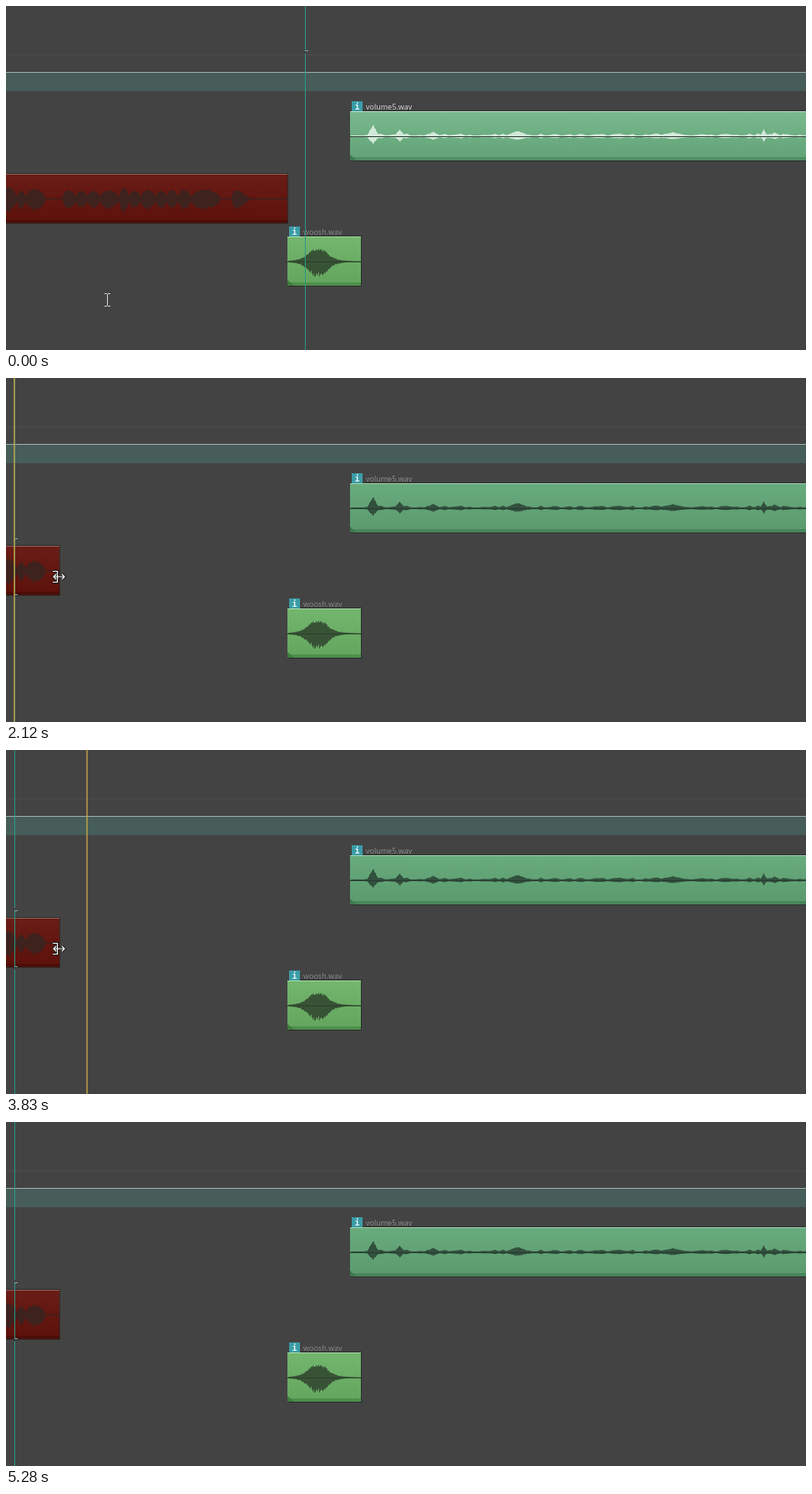
These frames come from a looping animation (958 px wide and 412 px high, 6.15 s). An HTML page with a canvas:

```html
<!DOCTYPE html>
<html>
<head>
<meta charset="utf-8">
<style>
html, body { margin: 0; width: 100%; height: 100%; overflow: hidden; background: #434343; }
canvas { display: block; }
</style>
</head>
<body>
<canvas id="stage" width="958" height="412"></canvas>
<script>
const ctx = document.getElementById('stage').getContext('2d');
const LOOP = 6150, SELECT = 1130, TRIM = 2120;

// Each word is a run of syllable borders; each burst is [centre x, half width, height]
const WORDS = [[-6, 13, 24, 47], [68, 84, 98, 113, 136, 147, 162, 179, 193, 206, 222, 257]];
const BURSTS = [[439, 7, 14], [471, 6, 8], [511, 8, 5], [612, 14, 6], [798, 18, 4], [907, 4, 8], [920, 7, 4]];

const POINTER = [[0, 'beam', 121, 352], [300, 'beam', 94, 288], [450, 'arrow', 75, 251],
  [600, 'arrow', 67, 241], [720, 'arrow', 64, 238], [TRIM, 'trim', 63, 238],
  [5030, 'beam', 99, 278], [5155, 'beam', 514, 385], [5280, 'none', 0, 0]];

function noise(n) {
  const s = Math.sin(n * 12.9898) * 43758.5453;
  return s - Math.floor(s);
}

function smoothNoise(n) {
  const i = Math.floor(n);
  return noise(i) + (noise(i + 1) - noise(i)) * (n - i);
}

function voiceLevel(x) {
  if (x >= 270 && x < 292) return 10 * Math.min(1, (x - 268) / 5, (292 - x) / 14);
  for (const word of WORDS) {
    const i = word.findIndex(border => border > x);
    if (i < 1) continue;
    const u = (x + 0.5 - word[i - 1]) / (word[i] - word[i - 1]);
    return (10 + 5 * noise(word[i])) * Math.sin(Math.PI * u) ** 0.5 * (1.1 - 0.3 * u);
  }
  return 0;
}

function volumeLevel(x) {
  const ripple = x < 430 ? 0 : 2.6 * smoothNoise(x / 5) ** 2;
  return Math.max(ripple, ...BURSTS.map(([c, w, h]) => h * (1 - Math.abs(x - c) / w)));
}

const wooshLevel = x => 16 / (1 + Math.abs((x - 373) / 14) ** 3);

function rect(x, y, w, h, color) {
  ctx.fillStyle = color;
  ctx.fillRect(x, y, w, h);
}

function wave(level, from, to, mid, below, base, color) {
  for (let x = from; x < to; x++) {
    const h = level(x);
    const up = base + h * (1 - 0.2 * noise(x));
    const down = base + h * below * (1 - 0.3 * noise(x + 500));
    rect(x, mid - up, 1, up + down, color);
  }
}

function body(x, y, w, light, dark, edge, foot) {
  const g = ctx.createLinearGradient(0, y, 0, y + 59);
  g.addColorStop(0, light);
  g.addColorStop(1, dark);
  rect(x, y - 1, w + 1, 61, '#2b2f2c');
  rect(x, y, w, 59, g);
  rect(x, y, w, 1, edge);
  rect(x, y + 55, w, 4, foot);
}

function corner(x, y, color) {
  ctx.fillStyle = color;
  ctx.fill(new Path2D(`M${x} ${y}l8 7h-8z`));
}

function label(text, x, y, icon, color) {
  if (icon) {
    rect(x, y, 13, 12, '#3a9ca6');
    ctx.font = 'bold 10px "DejaVu Sans Mono", monospace';
    ctx.fillStyle = '#e8f4f4';
    ctx.fillText('i', x + 3.5, y + 10);
  }
  ctx.font = '9px "Open Sans", sans-serif';
  ctx.fillStyle = color;
  ctx.fillText(text, x + (icon ? 17 : 0), y + 10);
}

function voiceClip(end, selected) {
  if (selected) body(0, 201, end, '#7c332c', '#661c15', '#a46a64', '#551610');
  else body(0, 201, end, '#691d16', '#5d110b', '#94605b', '#4d0d08');
  wave(voiceLevel, 0, end, 231, 1.15, 0.7, selected ? '#d5b9b6' : '#3d221e');
}

function volumeClip(selected, icon) {
  if (selected) body(412, 126, 546, '#7ab98e', '#61a277', '#b9dfc6', '#4f8f63');
  else body(412, 126, 546, '#68ab7d', '#5a9a6e', '#9fd0b0', '#488559');
  corner(412, 178, '#3f7a50');
  wave(volumeLevel, 413, 958, 156, 0.7, 1, selected ? '#d3e9da' : '#32503e');
  rect(412, 156, 546, 1, '#263b2e');
  label('volume5.wav', 414, 114, icon, selected ? '#dcdcdc' : '#929292');
}

function wooshClip(icon) {
  body(337, 276, 88, '#73b66d', '#64a55e', '#a9d9a5', '#4f8f4b');
  corner(337, 328, '#427c3f');
  wave(wooshLevel, 338, 425, 306, 1.15, 0, '#385236');
  rect(337, 306, 88, 1, '#2b402a');
  label('woosh.wav', 339, 264, icon, '#8a8a8a');
}

// Edit cursor: a line broken by the bracket around the active track
function editCursor(x, top, bottom) {
  const line = '#2b9a87', hook = '#6fb3a8';
  rect(x, 0, 1, top - 3, line);
  rect(x, top, 1, bottom - top, line);
  rect(x, bottom + 3, 1, 412, line);
  rect(x, top, 4, 1, hook);
  rect(x, bottom - 1, 4, 1, hook);
}

// Playback advances in even steps while it runs
function playLine(t) {
  if (t < TRIM || t >= 4760) return;
  const step = Math.floor((t - 2400) / 140);
  const x = step < 0 ? 9 : Math.round(17.3 + 7.82 * step);
  rect(x, 0, 2, 412, 'rgba(210,170,70,.65)');
}

function trace(path, width, color) {
  ctx.lineWidth = width;
  ctx.strokeStyle = color;
  ctx.stroke(path);
}

const pointers = {
  none() {},
  beam() {
    trace(new Path2D('M-3-7.5H0M1-7.5H4M.5-7V7M-3 7.5H0M1 7.5H4'), 1, '#d8d8d8');
  },
  arrow() {
    const p = new Path2D('M.5.5V16.5L4 13L6.5 18.5L9 17.5L6.5 12H11.5Z');
    ctx.fillStyle = '#fff';
    ctx.fill(p);
    trace(p, 1, '#000');
  },
  trim() {
    const p = new Path2D('M-7-6.5H-1.5V6.5H-7M-5 0H6M-3-3L-6 0L-3 3M4-3L7 0L4 3');
    trace(p, 3.2, '#1c1c1c');
    trace(p, 1.2, '#fff');
  }
};

function render(t) {
  const before = t < SELECT, trimmed = t >= TRIM, icons = before || trimmed;
  rect(0, 0, 958, 412, '#434343');
  rect(0, 58, 958, 1, '#4d4d4d');
  rect(0, 79, 958, 1, '#a5aeab');
  rect(0, 80, 958, 22, '#465d59');

  voiceClip(trimmed ? 64 : 337, !icons);
  volumeClip(before, icons);
  wooshClip(icons);

  if (before) editCursor(358, -20, 54);
  else editCursor(trimmed ? 10 : 64, 192, 260);
  playLine(t);

  const [, kind, x, y] = POINTER.filter(k => k[0] <= t).pop();
  ctx.save();
  ctx.translate(x, y);
  pointers[kind]();
  ctx.restore();
}

const start = performance.now();
function tick() {
  render((performance.now() - start) % LOOP);
  requestAnimationFrame(tick);
}
tick();
</script>
</body>
</html>
```
